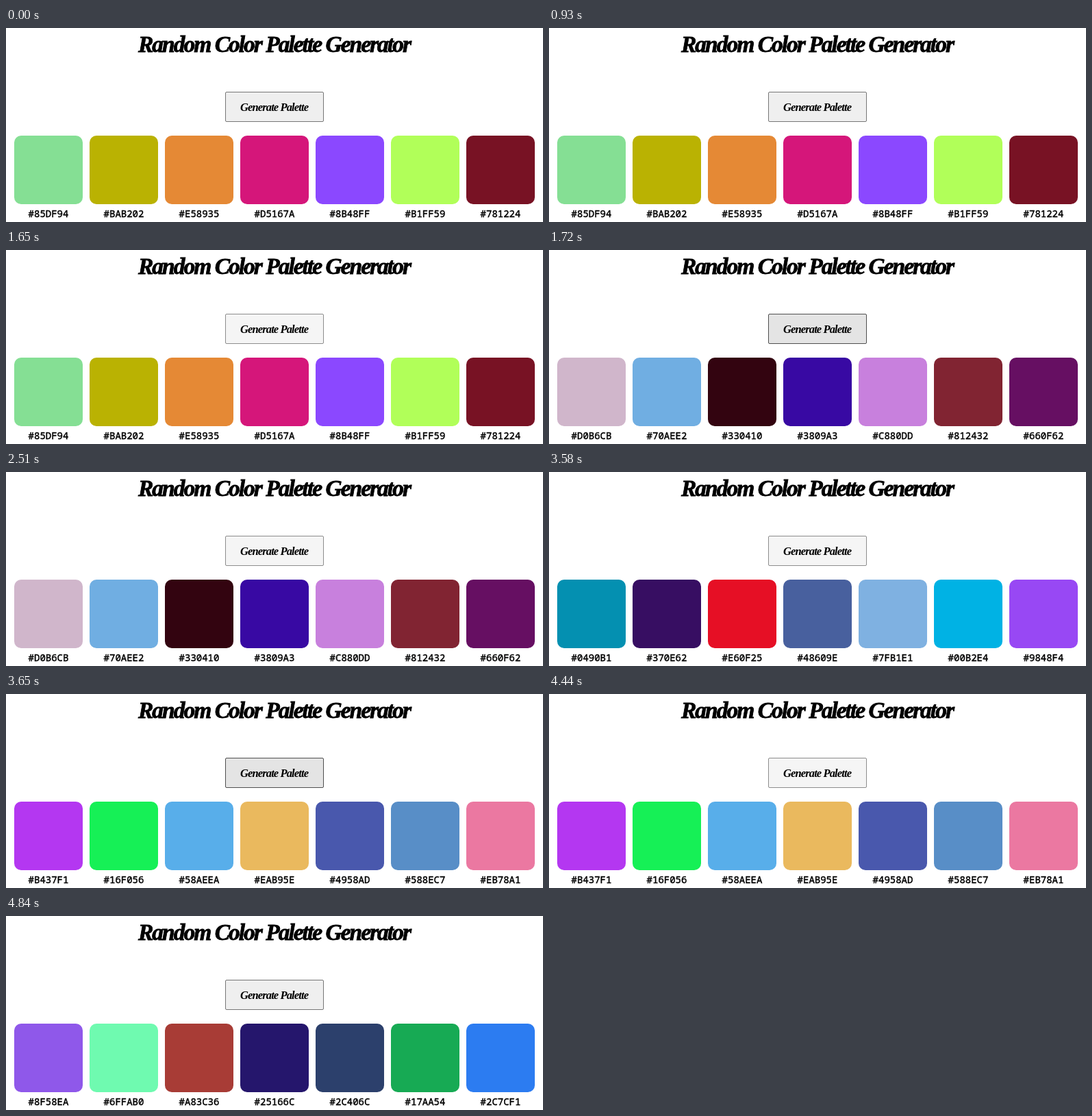
An HTML page for the animation above (5.57 s loop, 784x283 px).

```html
<!DOCTYPE html>
<html lang="en">
<head>
<meta charset="utf-8">
<title>Random Color Palette Generator</title>
<style>
  html, body { margin: 0; width: 100%; height: 100%; overflow: hidden; background: #fff; }
  svg { display: block; }
  .script { font-family: "Liberation Serif", "Times New Roman", serif; font-weight: 700; font-style: italic; }
  .title { font-size: 33.5px; letter-spacing: -2px; stroke: #000; stroke-width: .8px; }
  .label { font-size: 16.5px; letter-spacing: -.88px; }
  .code { font: 400 14px "Noto Sans Mono", "DejaVu Sans Mono", monospace; text-anchor: middle; stroke: #000; stroke-width: .45px; }

  #button { animation: button 5570ms step-end infinite; }
  #rows { animation: rows 5570ms step-end infinite; }

  /* idle, hover and pressed states */
  @keyframes button {
    0%, 16.696%, 86.894% { fill: #efefef; stroke: #767676; }
    13.105%, 21.364%, 30.879%, 47.396%, 65.529%, 80.969% { fill: #e4e4e4; stroke: #4f4f4f; }
    29.623%, 45.062%, 64.272%, 79.712% { fill: #f5f5f5; stroke: #8d8d8d; }
    100% { fill: #efefef; stroke: #767676; }
  }
  /* each press brings the next palette into the window */
  @keyframes rows {
    0% { transform: translateY(0); }
    30.879% { transform: translateY(-140px); }
    47.396% { transform: translateY(-280px); }
    65.529% { transform: translateY(-420px); }
    80.969%, 100% { transform: translateY(-560px); }
  }
</style>
</head>
<body>
<svg width="784" height="283" viewBox="0 0 784 283">
  <text class="script title" x="193" y="34.5">Random Color Palette Generator</text>
  <rect id="button" x="320.5" y="93.5" width="143" height="43" rx="1.5"/>
  <text class="script label" x="342" y="121">Generate Palette</text>
  <svg y="157" width="784" height="126" overflow="hidden"><g id="rows"></g></svg>
</svg>
<script>
  const palettes = [
    "85DF94 BAB202 E58935 D5167A 8B48FF B1FF59 781224",
    "D0B6CB 70AEE2 330410 3809A3 C880DD 812432 660F62",
    "0490B1 370E62 E60F25 48609E 7FB1E1 00B2E4 9848F4",
    "B437F1 16F056 58AEEA EAB95E 4958AD 588EC7 EB78A1",
    "8F58EA 6FFAB0 A83C36 25166C 2C406C 17AA54 2C7CF1"
  ];
  const swatch = (hex, column, row) => {
    const x = 12 + column * 110, y = row * 140;
    return `<rect x="${x}" y="${y}" width="100" height="100" rx="10" fill="#${hex}"/>
      <text class="code" x="${x + 50}" y="${y + 119}">#${hex}</text>`;
  };
  document.getElementById("rows").innerHTML = palettes.map((palette, row) =>
    palette.split(" ").map((hex, column) => swatch(hex, column, row)).join("")
  ).join("");
</script>
</body>
</html>
```
